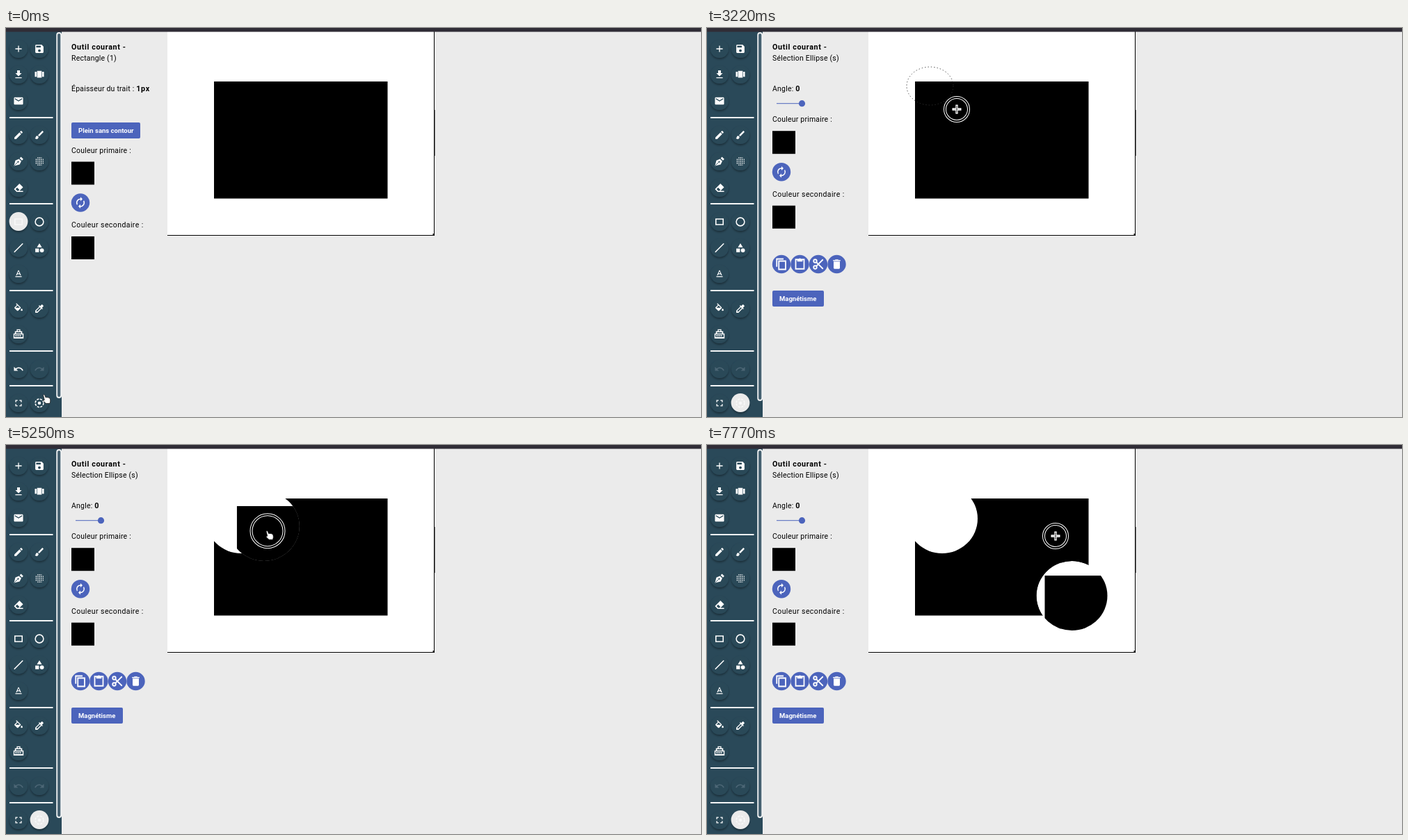
An HTML page that plays this animation: 999 px wide and 560 px high, repeating every 7.84 s.

```html
<!DOCTYPE html>
<html lang="fr">
<head>
<meta charset="utf-8">
<title>Sélection ellipse</title>
<style>
html, body { margin: 0; width: 100%; height: 100%; overflow: hidden; background: #ebebeb; }
svg { display: block; width: 999px; height: 560px; }
text { font-family: Roboto, sans-serif; font-size: 10.5px; letter-spacing: .2px; fill: #000; white-space: pre; }
.b { font-weight: 700; font-size: 10.8px; letter-spacing: .6px; }
.btn { font-weight: 700; font-size: 9.5px; letter-spacing: 0; fill: #fff; }
.ic { fill: #fff; fill-rule: evenodd; }
.st { fill: none; stroke: #fff; stroke-width: 2.4; }
</style>
</head>
<body>
<svg id="stage" viewBox="0 0 999 560"></svg>
<script>
const LOOP = 7840, STEP = 70;
const BLUE = '#4c64bc', DIM = '#4c6675', BAR = '#2a4959', GREY = '#ebebeb';
const $ = id => document.getElementById(id);

// Icons are drawn on a 24 unit grid.
const fill = d => `<path class="ic" d="${d}"/>`;
const line = (d, more = '') => `<path class="st" d="${d}" ${more}/>`;
const icons = {
  add: fill('M19 13h-6v6h-2v-6H5v-2h6V5h2v6h6z'),
  save: fill('M17 3H5c-1.1 0-2 .9-2 2v14c0 1.1.9 2 2 2h14c1.1 0 2-.9 2-2V7zM12 19a3 3 0 1 1 0-6 3 3 0 0 1 0 6zM15 9H5V5h10z'),
  load: fill('M19 9h-4V3H9v6H5l7 7zM5 18v2h14v-2z'),
  carousel: fill('M7 19h10V4H7zM2 17h4V6H2zM18 6v11h4V6z'),
  mail: fill('M20 4H4c-1.1 0-2 .9-2 2v12c0 1.1.9 2 2 2h16c1.1 0 2-.9 2-2V6c0-1.1-.9-2-2-2zm0 4l-8 5-8-5V6l8 5 8-5z'),
  pencil: fill('M3 17.2V21h3.8L17.8 9.9l-3.7-3.7zM20.7 7c.4-.4.4-1 0-1.4l-2.3-2.3c-.4-.4-1-.4-1.4 0l-1.9 1.8 3.8 3.8z'),
  brush: fill('M7 14c-1.7 0-3 1.3-3 3 0 1.3-1.2 2-2 2 .9 1.2 2.5 2 4 2 2.2 0 4-1.8 4-4 0-1.7-1.3-3-3-3zM20.7 4.6l-1.3-1.3c-.4-.4-1-.4-1.4 0l-9 9 2.7 2.7 9-9c.4-.4.4-1 0-1.4z'),
  nib: fill('M2 22L5 10l8-3.5 5 5L14.500 19zM14.500 5l3-3 5 5-3 3zM9.500 13a1.700 1.700 0 1 0 3.400 0 1.700 1.700 0 1 0-3.400 0z'.replace(/00\b/g, '')) +
    '<path d="M3 21l7-7" stroke="#2a4959" stroke-width="1.3"/>',
  spray: line('M8 4h9M4 8h17M4 12h17M4 16h17M8 20h9', 'stroke-dasharray="1.9 2"'),
  eraser: fill('M8 21l-6-6L14 3l8 8-8 8h8v2zM5.5 15l3.500-3.500 5 5-2.500 2.500h-2z'),
  rect: line('M4 6h16v12H4z'),
  circle: '<circle class="st" cx="12" cy="12" r="9"/>',
  line: line('M2.500 21.500l19-19'),
  shapes: fill('M12 2l-5.500 9h11zM3 13.500h8v8H3z') + '<circle class="ic" cx="17.5" cy="17.5" r="4.5"/>',
  text: fill('M5 17v2h14v-2zM9.500 12.800h5l.9 2.200h2.100L12.700 4h-1.400L6.500 15h2.100zM12 6l1.900 5h-3.800z'),
  bucket: fill('M16.600 8.900L7.600 0 6.200 1.400l2.400 2.400-5.200 5.100c-.6.6-.6 1.600 0 2.200l5.500 5.500c.6.6 1.600.6 2.200 0l5.500-5.500c.6-.6.6-1.600 0-2.200zM5.200 10L10 5.200l4.800 4.800zM19 11.500s-2 2.200-2 3.500a2 2 0 0 0 4 0c0-1.300-2-3.500-2-3.500z'),
  pipette: fill('M20.700 5.600l-2.300-2.300c-.4-.4-1-.4-1.400 0l-3.200 3.100-1.900-1.900-1.400 1.400 1.400 1.400L3 16.200V21h4.800l8.900-8.900 1.400 1.400 1.400-1.400-1.900-1.900L20.700 7c.4-.4.4-1 0-1.400zM6.900 19L5 17.100 13.100 9l1.900 1.900z'),
  stamp: fill('M8 1h8v4h4v5h3v11H1V10h3V5h4zM10 3v2h4V3zM6.500 7.500v2.500h11V7.500zM3 12.500v5.500h18v-5.500z') +
    line('M5 15.200h14', 'stroke-dasharray="3 1.6"'),
  undo: fill('M12.500 8c-2.600 0-5 1-6.900 2.600L2 7v9h9l-3.600-3.600c1.400-1.200 3.200-1.900 5.100-1.900 3.500 0 6.500 2.300 7.600 5.500l2.400-.8C21.100 11 17.100 8 12.500 8z'),
  full: fill('M7 14H5v5h5v-2H7zM5 10h2V7h3V5H5zM17 17h-3v2h5v-5h-2zM14 5v2h3v3h2V5z'),
  ellipse: '<circle class="st" cx="12" cy="12" r="9" stroke-dasharray="4.7 2.4"/><circle class="ic" cx="12" cy="12" r="3.4"/>',
  swap: fill('M12 6v3l4-4-4-4v3a8 8 0 0 0-6.800 12.300l1.500-1.500A6 6 0 0 1 12 6zM18.800 7.700l-1.500 1.500A6 6 0 0 1 12 18v-3l-4 4 4 4v-3a8 8 0 0 0 6.800-12.300z'),
  copy: line('M16 2H3v15M7 6h13v16H7z', 'stroke-width="2"'),
  paste: line('M4 3h16v18H4z', 'stroke-width="2"') + fill('M7 3h2.500a2.500 2.500 0 0 1 5 0H17v4H7z'),
  cut: line('M8.500 8.500L21 21M8.500 15.500L21 3') +
    '<circle class="st" cx="6" cy="6" r="3"/><circle class="st" cx="6" cy="18" r="3"/>',
  bin: fill('M6 19c0 1.100.9 2 2 2h8c1.100 0 2-.9 2-2V7H6zM19 4h-3.500l-1-1h-5l-1 1H5v2h14z')
};
const icon = (name, x, y, size = 15.7) =>
  `<g transform="translate(${x - size / 2} ${y - size / 2}) scale(${size / 24})">${icons[name]}</g>`;
const text = (x, y, s, more = '') => `<text x="${x}" y="${y}" ${more}>${s}</text>`;
const box = (x, y, w, h, f, more = '') =>
  `<rect x="${x}" y="${y}" width="${w}" height="${h}" fill="${f}" ${more}/>`;
const round = (name, x, y) => `<circle cx="${x}" cy="${y}" r="13.2" fill="${BLUE}"/>` + icon(name, x, y, 18);

const rows = [
  [30, 'add', 'save'], [67, 'load', 'carousel'], [105, 'mail'],
  [154, 'pencil', 'brush'], [192, 'nib', 'spray'], [230, 'eraser'],
  [279, 'rect', 'circle'], [316.5, 'line', 'shapes'], [354, 'text'],
  [404, 'bucket', 'pipette'], [441, 'stamp'], [491, 'undo', 'redo'], [540, 'full', 'ellipse']
];

function toolbar() {
  let discs = '', marks = '';
  for (const [y, ...names] of rows) names.forEach((name, i) => {
    const x = 18 + 30 * i;
    discs += `<circle cx="${x}" cy="${y}" r="13"/>`;
    if (name === 'redo') marks += `<g transform="matrix(-1 0 0 1 96 0)" class="dim">${icon('undo', 48, y)}</g>`;
    else marks += `<g id="t-${name}">${icon(name, x, y)}</g>`;
  });
  const rules = [129, 253, 378, 465, 515].map(y => box(5, y - 1, 62.5, 2, '#f4f6f7')).join('');
  return box(0, 5, 80, 555, BAR) +
    `<g fill="${BAR}" filter="url(#shade)">${discs}</g>` + rules +
    `<circle id="active" r="13.4" fill="${GREY}"/>` + marks +
    `<rect id="thumb" x="73.2" y="7" width="6" rx="3" fill="#456070" stroke="#f2f4f5" stroke-width="1.8"/>`;
}

function panel() {
  return text(94, 31, 'Outil courant -', 'class="b"') +
    `<g id="rectPanel">` + text(94, 47, 'Rectangle (1)') +
      text(94, 90.5, 'Épaisseur du trait : <tspan class="b">1px</tspan>') +
      box(94, 136, 99, 23, BLUE, 'rx="2"') + text(104, 150.8, 'Plein sans contour', 'class="btn"') + '</g>' +
    `<g id="selPanel">` + text(94, 47, 'Sélection Ellipse (s)') +
      text(94, 90.5, 'Angle: <tspan class="b">0</tspan>') +
      box(100, 108.2, 36, 1, BLUE) + `<circle cx="136.5" cy="108.7" r="4.6" fill="${BLUE}"/>` +
      ['copy', 'paste', 'cut', 'bin'].map((n, i) => round(n, 107 + 26.5 * i, 340)).join('') +
      box(94, 378, 74, 23, BLUE, 'rx="2"') + text(104, 393, 'Magnétisme', 'class="btn"') + '</g>' +
    `<g id="colours">` + text(94, 179.5, 'Couleur primaire :') + box(94, 192.5, 33, 33, '#000') +
      round('swap', 107, 251.5) +
      text(94, 287, 'Couleur secondaire :', 'style="letter-spacing:.42px"') + box(94, 300, 33, 33, '#000') + '</g>';
}

// Selection geometry: the ellipse fills the box from (287,56) to (389,156).
const SEL = { x: 287, y: 56, w: 102, h: 100, cx: 338, cy: 106 };
const BLOCK = box(299, 77, 249.5, 168.5, '#000');
const oval = more => `<ellipse cx="338" cy="106" rx="51" ry="50" ${more}/>`;

function handles() {
  let s = '';
  for (let i = 0; i < 3; i++) for (let j = 0; j < 3; j++)
    if (i !== 1 || j !== 1) s += `<circle cx="${SEL.x + i * 51}" cy="${SEL.y + j * 50}" r="2"/>`;
  return s;
}

function drawing() {
  return box(232, 5, 383.500, 294, '#fff') + box(232, 298, 384, 1, '#000') + box(615, 5, 1, 294, '#000') +
    box(615.5, 118, 1, 66, '#000') + box(613.5, 296, 2.5, 3, '#000') + BLOCK +
    `<g id="hole">${oval('fill="#fff"')}</g>` +
    `<g id="piece"><g clip-path="url(#cut)">${oval('fill="#fff"')}${BLOCK}</g>` +
      `<g id="controls">${oval('fill="none" stroke="#000" stroke-dasharray="2 2.4"')}` +
      box(SEL.x, SEL.y, SEL.w, SEL.h, 'none', 'stroke="#d0d5e6" stroke-dasharray="2.2 2"') + handles() + '</g></g>' +
    `<ellipse id="band" fill="none" stroke="#333" stroke-width=".9" stroke-dasharray="1.4 3"/>`;
}

function pointer() {
  return `<g id="pointer"><g id="ring" fill="none"><circle stroke="#fff" stroke-width="4"/>` +
    `<circle stroke="#000" stroke-width="2"/></g>` +
    `<g id="cross"><path d="M-6.500 0h13M0-6.500v13" stroke="#fff" stroke-width="3.4"/>` +
    `<path d="M-5 0h10" stroke="#999" stroke-width=".7"/><path d="M0-5v10" stroke="#222"/></g>` +
    `<path id="hand" transform="translate(-1 0)" fill="#fff" stroke="#111" stroke-width=".7" ` +
    `d="M-1 .5Q0-1 1.200.5L2.600 4Q4 3.200 5 4 6.500 3.400 7.300 4.600 9 4.500 9 6.500L9.300 9l-.8 3.500H3L-.8 9Q-1.500 7 .8 7.500z"/></g>`;
}

$('stage').innerHTML = `<defs><clipPath id="cut">${oval('')}</clipPath>
  <filter id="shade" x="-20%" y="-5%" width="140%" height="110%">
  <feDropShadow dx="0" dy="1.8" stdDeviation="1.6" flood-color="#000" flood-opacity=".4"/></filter></defs>
  <style>.dim .ic { fill: ${DIM} } .pale .ic { fill: #f8f8f8 } .pale .st { stroke: #f8f8f8 }</style>` +
  box(0, 0, 999, 560, GREY) + toolbar() + panel() + drawing() + box(0, 0, 999, 5.5, '#302d36') + pointer();

// Pointer path: time, x, y.
const path = [
  [0, 55.5, 528], [909, 55.5, 528], [910, 164, 147], [1260, 164, 147], [1700, 303, 42],
  [2000, 287, 66], [2240, 287, 66], [2400, 287, 56], [2890, 287, 56], [3160, 354, 111],
  [3220, 359, 117], [3600, 389, 156], [3850, 389, 156], [4400, 338, 111], [4950, 338, 111],
  [5400, 395, 130], [5810, 480, 168], [5910, 504.5, 191], [5950, 507, 193], [6450, 524.5, 222],
  [6800, 524.5, 222], [7500, 506, 150], [7600, 501, 131], [LOOP, 501, 131]
];
function at(t) {
  const i = path.findIndex(p => p[0] > t);
  const [t0, x0, y0] = path[i - 1], [t1, x1, y1] = path[i];
  const k = (t - t0) / (t1 - t0);
  return [x0 + (x1 - x0) * k, y0 + (y1 - y0) * k];
}

const set = (el, o) => { for (const k in o) el.setAttribute(k, o[k]); };
const show = (id, on) => $(id).style.display = on ? '' : 'none';
const within = (t, a, b) => t >= a && t < b;
const rings = [...$('ring').children];

function render(t) {
  const sel = t >= 1260;
  show('rectPanel', !sel);
  show('selPanel', sel);
  set($('colours'), { transform: `translate(0 ${sel ? -44.3 : 0})` });
  set($('active'), { cx: sel ? 48 : 18, cy: sel ? 539.5 : 278.5 });
  set($('thumb'), { height: sel ? 529 : 525 });
  $('t-rect').setAttribute('class', sel ? '' : 'pale');
  $('t-ellipse').setAttribute('class', sel ? 'pale' : '');

  const banding = within(t, 2520, 3850), moving = within(t, 4690, 6650), clicked = t >= 7630;
  $('t-undo').setAttribute('class', banding || moving || clicked ? 'dim' : '');

  show('band', banding);
  if (banding) {
    const [x, y] = at(t - 60);
    const rx = (x - SEL.x) / 2, ry = (y - SEL.y) / 2;
    set($('band'), { cx: SEL.x + rx, cy: SEL.y + ry, rx, ry });
  }

  show('hole', t >= 4690);
  show('piece', t >= 3850);
  show('controls', within(t, 3850, 4690) || within(t, 6650, 7630));
  const [mx, my] = at(Math.min(Math.max(t - 40, 4690), 6700));
  set($('piece'), { transform: `translate(${mx - 338} ${my - 111})` });

  const [x, y] = at(t);
  const cross = within(t, 1500, 4690) || t >= 6800;
  const hold = within(t, 4690, 6510);
  set($('pointer'), { transform: `translate(${x} ${y})` });
  show('cross', cross);
  show('hand', !cross);
  show('ring', within(t, 2520, 3780) || hold || clicked);
  rings.forEach(c => set(c, { r: hold ? 23.5 : 17 }));
}

const start = performance.now();
function tick() {
  const t = (performance.now() - start) % LOOP;
  render(Math.floor(t / STEP) * STEP);
  requestAnimationFrame(tick);
}
tick();
</script>
</body>
</html>
```
